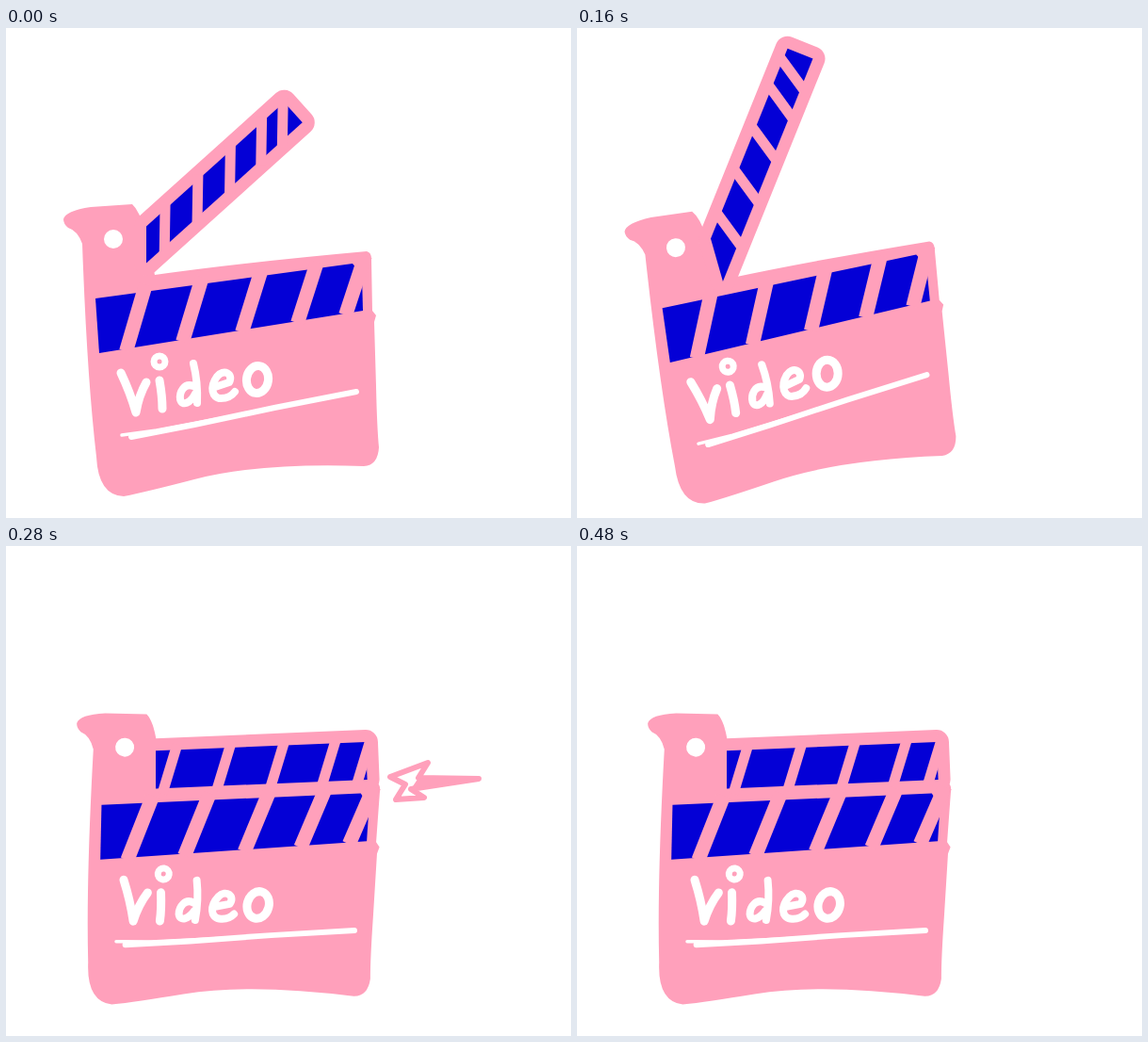
An HTML page that plays this animation: 600x520 px, repeating every 720 ms.

```html
<!DOCTYPE html>
<html lang="en">
<head>
<meta charset="utf-8">
<title>Clapperboard</title>
<style>
html, body { margin: 0; width: 100%; height: 100%; overflow: hidden; background: #fff; }
svg { display: block; width: 600px; height: 520px; }
.pink { fill: #ffa0bb; }
.blue { fill: #0400d6; }
.cut, .rim, #bolt { stroke: #ffa0bb; fill: none; stroke-linejoin: round; }
.rim { stroke-width: 26; }
.ink { fill: none; stroke: #fff; stroke-width: 9; stroke-linecap: round; stroke-linejoin: round; }
</style>
</head>
<body>
<svg viewBox="0 0 600 520">
  <path id="board" class="pink" d="M61 203Q63 194 90 190L134 187Q142 194 147 215L158 262Q250 249 383 237Q388 238 388 245
    L389 300L393 305L391 312L393 380Q394 425 396 445Q395 464 380 465Q270 461 200 479Q150 492 125 497
    Q98 496 96 455Q86 370 81 229Q76 215 66 212Q61 208 61 203Z"/>
  <g id="arm">
    <path id="rim" class="rim"/>
    <path id="slab" class="blue"/>
    <path id="armCuts" class="cut" stroke-width="11"/>
  </g>
  <g id="face">
    <path class="blue" d="M95 287L368 250L378 262L379 300L99 345Z"/>
    <path id="faceCuts" class="cut" stroke-width="15"/>
    <circle cx="114" cy="224" r="10" fill="#fff"/>
  </g>
  <g id="lettering" class="ink" role="img" aria-label="Video">
    <path d="M122 366Q132 387 138 408Q141 390 149 376"/>
    <path d="M163 374Q166 391 166 404"/>
    <ellipse cx="163" cy="354" rx="6" ry="6" stroke-width="7"/>
    <path d="M199 356Q204 376 203 398M199 380C189 376 184 387 185 394C187 402 196 398 201 388" stroke-width="8"/>
    <path d="M222 381L237 376C242 367 231 361 224 370C216 381 219 393 228 393Q238 393 243 386" stroke-width="8"/>
    <ellipse cx="267" cy="373" rx="11.5" ry="14.5" transform="rotate(8 267 373)"/>
    <path d="M133 434L200 421L285 403L372 386" stroke-width="6"/>
    <path d="M123 432L160 427L240 412" stroke-width="3.5"/>
  </g>
  <g id="bolt" stroke-width="6">
    <path d="M408 245L448 230L438 246L502 247L430 258L444 267L414 269L424 253Z"/>
    <path class="pink" stroke="none" d="M438 246L502 247L430 258Z"/>
  </g>
</svg>
<script>
const LOOP = 720;
const $ = id => document.getElementById(id);
const set = (id, name, value) => $(id).setAttribute(name, value);

// Board: tilt in degrees, and the screen x where the arm's blue begins.
const rest = { turn: 0, hinge: 149 };
const back = { turn: -4.2, hinge: 142 };
const shut = { turn: 5.2, hinge: 159 };

// Arm: axis start, angle, length, blue height, lean and spread of its cuts.
const poses = [
  { end: 120, board: rest, x: 149, y: 230, turn: -42, len: 210, h: 29, lean: 27, span: 217 },
  { end: 160, board: rest, x: 152, y: 228, turn: -52, len: 219, h: 31, lean: 27, span: 217 },
  { end: 240, board: back, x: 149, y: 245, turn: -68, len: 235, h: 29, lean: 18, span: 230 },
  { end: 280, board: back, x: 140, y: 238, turn: -17.8, len: 240, h: 33, lean: 21, span: 238 },
  { end: LOOP, board: shut, x: 132, y: 238.5, turn: -2.4, len: 251, h: 40, lean: 14, span: 266 }
];
const ARM_CUTS = [0.184, 0.4, 0.614, 0.82, 0.96];
const FACE_CUTS = [146, 206, 269, 328, 379];
const BOLT = { start: 240, end: 480, hold: 80, step: 42 };

// A slanted line across a band, overshooting both rails a little.
function cut(x, top, bottom, lean, over = 0.15) {
  const dx = lean * over, dy = (bottom - top) * over;
  return `M${x + dx},${top - dy}L${x - lean - dx},${bottom + dy}`;
}

function drawArm({ board, x, y, turn, len, h, lean, span }) {
  const a = turn * Math.PI / 180, half = h / 2;
  // Distance along the arm at which a rail meets the upright hinge line.
  const from = v => Math.max(-20, (board.hinge - x + v * Math.sin(a)) / Math.cos(a));
  const slab = `M${from(-half)},${-half}H${len}V${half}H${from(half)}Z`;
  set('rim', 'd', slab);
  set('slab', 'd', slab);
  set('armCuts', 'd', ARM_CUTS.map(f => cut(f * span, -half, half, lean)).join(''));
  set('arm', 'transform', `translate(${x} ${y}) rotate(${turn})`);
}

function drawBoard({ turn }) {
  const tilt = `rotate(${turn} 234 352)`;
  set('board', 'transform', tilt);
  set('face', 'transform', tilt);
  set('lettering', 'transform', `rotate(${turn * 1.5} 209 382)`);
}

set('faceCuts', 'd', FACE_CUTS.map(x => {
  const top = 300 - 0.135 * x;
  return cut(x, top, top + 58 - 0.025 * x, 16);
}).join(''));

let shown;
function draw(t) {
  const pose = poses.find(p => t < p.end);
  if (pose !== shown) {
    shown = pose;
    drawBoard(pose.board);
    drawArm(pose);
  }
  const flying = t >= BOLT.start && t < BOLT.end;
  const shift = BOLT.step * Math.floor((t - BOLT.start) / BOLT.hold);
  set('bolt', 'visibility', flying ? 'visible' : 'hidden');
  if (flying) set('bolt', 'transform', `translate(${shift} 0)`);
}

const begin = performance.now();
function tick() {
  draw((performance.now() - begin) % LOOP);
  requestAnimationFrame(tick);
}
tick();
</script>
</body>
</html>
```
